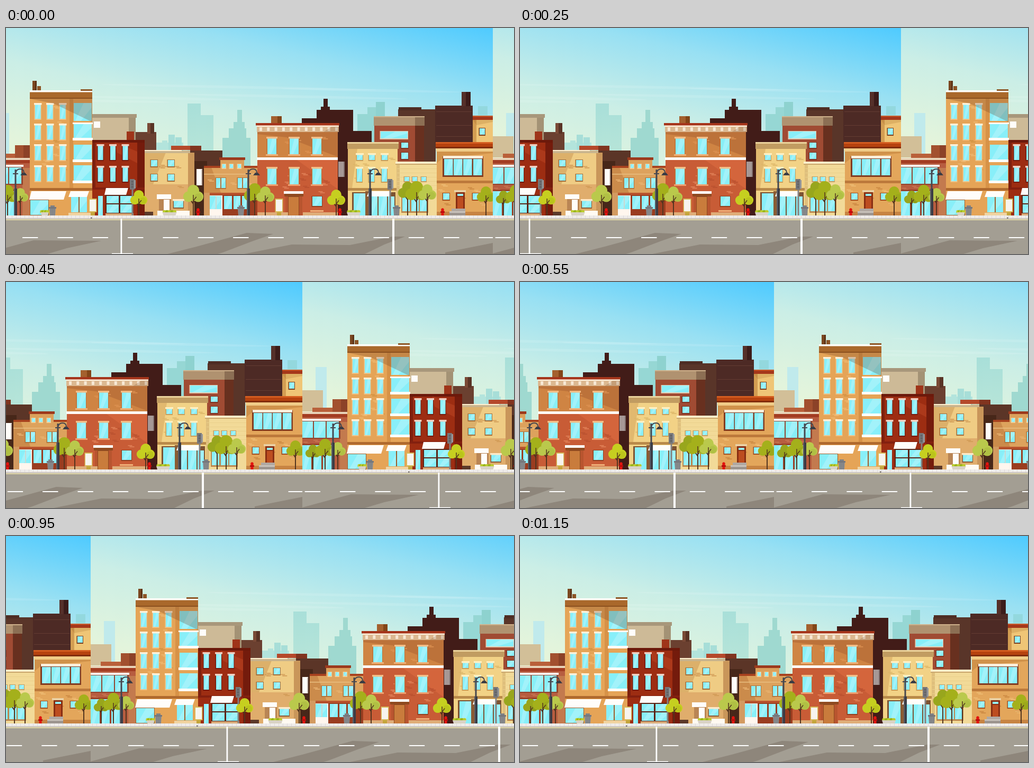
These frames come from a looping animation (960x428 px, 1.2 s). An HTML page with a canvas:

```html
<!DOCTYPE html>
<html lang="en">
<head>
<meta charset="utf-8">
<title>City street</title>
<style>
html, body { margin: 0; width: 100%; height: 100%; overflow: hidden; background: #a39e93; }
#stage { position: relative; width: 960px; height: 428px; overflow: hidden; }
#strip { position: absolute; left: 0; top: 0; width: 1920px; height: 428px; will-change: transform; }
canvas { position: absolute; top: 0; left: 0; width: 960px; height: 428px; }
canvas + canvas { left: 960px; }
</style>
</head>
<body>
<div id="stage"><div id="strip"><canvas width="960" height="428"></canvas><canvas width="960" height="428"></canvas></div></div>
<script>
const [first, second] = document.querySelectorAll('canvas');
const g = first.getContext('2d');
const GLASS = '#88eff9', WHITE = '#fffdfa';

let seed = 7;
const rnd = () => (seed = seed * 16807 % 2147483647) / 2147483647;

// Rectangle by its edges: left, top, right, bottom
function box(color, l, t, r, b) {
  g.fillStyle = color;
  g.fillRect(l, t, r - l, b - t);
}
function poly(color, ...p) {
  g.fillStyle = color;
  g.beginPath();
  for (let i = 0; i < p.length; i += 2) g.lineTo(p[i], p[i + 1]);
  g.fill();
}
function disc(color, x, y, r) {
  g.fillStyle = color;
  g.beginPath();
  g.arc(x, y, r, 0, 7);
  g.fill();
}
function path(color, width, d) {
  g.strokeStyle = color;
  g.lineWidth = width;
  g.stroke(new Path2D(d));
}
function fade(x0, y0, x1, y1, ...colors) {
  const f = g.createLinearGradient(x0, y0, x1, y1);
  colors.forEach((c, i) => f.addColorStop(i / (colors.length - 1), c));
  return f;
}
function glass(l, t, r, b) {
  const w = r - l, h = b - t;
  box(GLASS, l, t, r, b);
  poly('rgba(255,255,255,.22)', l + w * .55, t, r, t, r, t + h * .25, l + w * .4, b, l + w * .08, b);
}
function pane(l, t, r, b, frame, lintel) {
  box(frame, l - 1.5, t - 1, r + 1, b + 2);
  glass(l, t, r, b);
  if (lintel) box(lintel, l - 2, t - 2, r + 2, t + 1.5);
}
function grid(xs, ys, w, h, frame, lintel) {
  for (const y of ys) for (const x of xs) pane(x, y, x + w, y + h, frame, lintel);
}
function bricks(color, l, t, r, b, n) {
  while (n--) {
    const x = l + rnd() * (r - l - 12), y = t + rnd() * (b - t - 5);
    box(color, x, y, x + 8, y + 1.6);
    box(color, x + 3, y + 2.4, x + 12, y + 4);
  }
}

function sky() {
  box(fade(0, 330, 122, -197, '#f3f6d2', '#e2f4dc', '#cbeee6', '#98e0f3', '#4dcaff'), 0, 0, 960, 360);
  for (const [x, y, w] of [[330, 133, 150], [480, 112, 260], [590, 130, 210], [730, 118, 170], [220, 138, 130]]) {
    g.fillStyle = 'rgba(255,255,255,.11)';
    g.beginPath();
    g.ellipse(x, y, w, 2.5, .02, 0, 7);
    g.fill();
  }
}

function skyline() {
  const teal = fade(0, 140, 0, 260, '#a8dfd9', '#bae6d8');
  box('#c0eaec', 25, 161, 46, 250);
  box(teal, 383, 143, 408, 260);
  box(teal, 408, 165, 432, 260);
  box('#b3e4dc', 324, 217, 375, 250);
  box('#b3e4dc', 335, 213, 345, 250);
  box('#a7ded8', 347, 202, 359, 250);
  box('#a7ded8', 360, 207, 372, 250);
  const tower = '#9fd9d0';
  box(tower, 449, 208, 502, 265);
  box(tower, 461, 190, 494, 210);
  box(tower, 470, 178, 491, 192);
  box(tower, 477, 155, 486, 180);
  box('#96d7d4', 704, 163, 756, 220);
  box('#96d7d4', 723, 150, 740, 170);
  box('#8ed2cf', 739, 140, 756, 220);
  box('#93d8de', 932, 148, 950, 170);
  box('#a2dfe0', 918, 165, 960, 180);
}

function backRow() {
  box('#d2bf98', 0, 205, 39, 245);
  box('#b9603a', 19, 238, 60, 248);
  box('#a2502f', 57, 222, 86, 250);
  box('#8c4228', 73, 222, 86, 250);
  // Beige block and its neighbours
  box('#6b4030', 284, 197, 324, 240);
  box('#593325', 307, 180, 320, 200);
  box('#7a4a36', 307, 180, 313, 200);
  box('#cdba97', 203, 168, 285, 214);
  box('#a39275', 272, 168, 285, 214);
  box('#a8977b', 203, 163, 287, 170);
  box(WHITE, 206, 177, 218, 189);
  box('#9f3419', 268, 196, 282, 214);
  box('#5b3527', 388, 232, 449, 300);
  box('#472719', 388, 252, 420, 355);
  // Dark stepped block
  const dark = '#421c18';
  box(dark, 599, 171, 696, 355);
  box(dark, 627, 155, 696, 200);
  box(dark, 635, 149, 652, 156);
  box(dark, 640, 134, 648, 150);
  box(dark, 690, 195, 731, 230);
  // Red block
  box('#593529', 781, 154, 852, 258);
  box('#4e2d24', 782, 150, 825, 156);
  box('#a04b33', 736, 182, 813, 256);
  box('#68301f', 813, 182, 830, 256);
  box('#b09270', 735, 167, 831, 185);
  box('#cfb18b', 735, 167, 831, 169);
  box('#8c6f54', 813, 169, 831, 185);
  pane(748, 196, 799, 209, '#e5cbb0');
  pane(787, 217, 800, 227, '#7c3524');
  pane(787, 236, 800, 248, '#7c3524');
  // Dark block with stack
  box('#4d2a25', 851, 147, 922, 217);
  for (const y of [158, 184, 205]) box('#633c33', 853, y, 920, y + 1);
  box('#55302a', 901, 121, 918, 148);
  box('#3c1c1a', 909, 121, 918, 148);
  // Yellow tower
  box('#efc576', 922, 172, 960, 217);
  box('#d39d52', 922, 172, 929, 217);
  poly('rgba(150,90,30,.2)', 922, 174, 960, 174, 960, 178, 929, 184);
  box('#a5371a', 922, 166, 960, 174);
  box('#c95a2c', 922, 166, 960, 168);
  pane(935, 190, 945, 202, '#7b4020');
}

function brickShop() {
  box('#b75d40', 0, 250, 85, 355);
  box('#c37a4e', 71, 265, 85, 355);
  box('#e8d3b8', 0, 246, 85, 250);
  box('#a33c22', 0, 250, 85, 256);
  box('#934630', 0, 261, 72, 297);
  for (const [l, r] of [[0, 20], [22, 44], [46, 69]]) glass(l, 264, r, 295);
  box(WHITE, 0, 259, 73, 263);
  bricks('#c87652', 2, 298, 80, 308, 3);
  box('#9b4128', 0, 306, 58, 355);
  for (const x of [0, 19, 39]) glass(x, 309, x + 17, 355);
}

function tanTower() {
  box('#7b4720', 90, 100, 98, 119);
  box('#5d3216', 95, 100, 98, 119);
  box('#8c5426', 99, 110, 106, 119);
  box('#e5a457', 85, 121, 203, 355);
  box('#d79247', 160, 134, 167, 303);
  bricks('#efb971', 88, 140, 160, 300, 6);
  bricks('#d0903f', 88, 140, 160, 300, 4);
  grid([95, 118, 142], [144, 183, 222, 262], 10.5, 28, '#eec48a', '#fff1d8');
  for (const [t, b, sill] of [[142, 176, 179], [182, 208, 208], [221, 249, 249], [260, 289, 289]]) {
    glass(168, t, 202, b);
    box(WHITE, 166, sill, 204, sill + (sill > 180 ? 5 : 3));
  }
  poly('rgba(110,60,30,.27)', 85, 134, 203, 134, 203, 178, 130, 143);
  box('#a9682b', 85, 121, 203, 134);
  box('#8b501f', 85, 132, 203, 134);
  box(WHITE, 85, 118, 203, 121.5);
  box('#8d5524', 181, 116, 203, 119);
  box('#b06a2e', 85, 303, 203, 308);
  box('#9c5d2a', 85, 325, 121, 355);
  glass(86, 326, 120, 354);
  glass(163, 320, 193, 349);
  box('#9c5d2a', 177, 320, 179, 349);
  box('#f0d4a2', 158, 350, 203, 355);
  poly(WHITE, 88, 309, 154, 309, 149, 325, 84, 325);
  poly(WHITE, 162, 309, 197, 309, 193, 320, 158, 320);
}

function redHouse() {
  box('#9d2d12', 203, 216, 302, 355);
  box('#741b0c', 288, 216, 302, 355);
  box('#7d200e', 203, 216, 209, 303);
  poly('#ac391b', 245, 216, 288, 234, 288, 256, 250, 236);
  grid([213.5, 237, 260.5], [222, 263], 10, 28, '#74190b', '#f3cfc0');
  box('#6c190b', 203, 212, 302, 217);
  box('#83200f', 203, 302, 302, 306);
  glass(214, 318, 223, 355);
  box('#5c2415', 228, 316, 281, 352);
  glass(230, 318, 253, 332);
  glass(256, 318, 279, 332);
  glass(230, 334, 253, 350);
  glass(256, 334, 279, 350);
  box('#d9aa78', 228, 351, 281, 355);
  poly(WHITE, 229, 303, 271, 303, 267, 316, 226, 316);
}

function creamHouse() {
  box('#efcc84', 302, 236, 384, 355);
  box('#c9965a', 384, 236, 396, 355);
  poly('#dcb06a', 302, 236, 342, 236, 318, 296, 302, 296);
  box('#e0ad6c', 302, 296, 384, 355);
  box('#b5482a', 352, 223, 409, 231);
  box('#81341f', 388, 223, 409, 232);
  box('#c9b48d', 302, 232, 388, 237);
  box('#fff0cf', 302, 231, 372, 233);
  bricks('#d09a55', 304, 240, 382, 310, 6);
  grid([314, 346], [250, 277], 12, 12, '#a36c38');
  box(WHITE, 325, 315, 352, 324);
  box('#b98554', 329, 324, 352, 355);
  box(WHITE, 338, 325, 349, 346);
  pane(357, 326, 375, 340, '#8d5a34', '#ffe9c6');
  box('#fffaf2', 326, 346, 387, 355);
  box('#5c392a', 302, 348, 318, 355);
}

function lowShop() {
  box('#dba05b', 445, 250, 490, 264);
  box('#9c3a1d', 443, 245, 492, 250);
  box('#dda25d', 414, 264, 516, 355);
  poly('#cb8b4b', 414, 264, 428, 264, 446, 312, 414, 312);
  for (const x of [449, 463, 478]) pane(x, 258, x + 6, 265, '#f2cf98');
  box('#a8421f', 414, 261, 445, 265);
  box('#a8421f', 490, 261, 516, 265);
  box('#e9bf82', 414, 276, 516, 277.5);
  bricks('#e9b472', 416, 280, 514, 310, 4);
  for (const x of [437, 478]) {
    pane(x, 284, x + 18, 303, '#b2743c');
    box('#b2743c', x + 8, 284, x + 10, 303);
  }
  box('#9a3d20', 424, 312, 516, 355);
  box('#b9532d', 424, 312, 516, 316);
  box('#fff6ee', 425, 317, 449, 355);
  glass(425, 318, 447, 343);
  box('#c9d8d2', 436, 318, 438, 343);
  glass(452, 318, 467, 343);
  glass(470, 318, 483, 343);
  glass(486, 318, 497, 343);
  box('#d39a60', 414, 312, 425, 355);
}

function brickHouse() {
  box('#a4602e', 541, 167, 561, 182);
  box('#834518', 553, 167, 561, 182);
  box('#cf8443', 515, 196, 667, 246);
  box('#d4653c', 515, 250, 667, 355);
  poly('rgba(110,40,20,.2)', 515, 197, 667, 197, 667, 244, 570, 207, 515, 201);
  poly('rgba(130,35,15,.14)', 515, 250, 590, 250, 667, 305, 667, 355, 515, 355);
  bricks('#de9252', 520, 205, 660, 240, 5);
  bricks('#e2835a', 520, 255, 660, 345, 6);
  bricks('#b9502f', 520, 255, 660, 345, 5);
  grid([534, 576, 619], [208, 265], 17, 31, '#bd7038', '#f3bd86');
  for (const x of [534, 576, 619]) {
    box('#f0b077', x - 3, 239, x + 20, 242);
    box('#f0a070', x - 3, 296, x + 20, 299);
  }
  pane(619, 319, 637, 337, '#93401f');
  box('#f0b078', 615, 345, 640, 348);
  box('#dcb890', 514, 184, 669, 197);
  for (let x = 519; x < 666; x += 14.3) box('#f7e8d4', x, 188, x + 5, 195);
  poly('rgba(120,70,30,.22)', 655, 187, 669, 184, 669, 197, 640, 197);
  box('#fff0dc', 514, 184, 669, 187);
  box('#a5351b', 512, 180, 670, 184.5);
  box(WHITE, 514, 245, 667, 250);
  box('#b8552f', 568, 314, 600, 355);
  box('#8f4a20', 573, 319, 594, 355);
  box('#c97c3c', 574, 320, 593, 355);
  box('#8f4a20', 566, 314, 602, 319);
  box(WHITE, 565, 309, 602, 314);
  box('#dfad78', 515, 349, 573, 355);
  box('#dfad78', 601, 349, 667, 355);
  box('#a69896', 668, 253, 680, 282);
  box('#81706e', 678, 253, 680, 282);
}

function paleHouse() {
  box('#f2d286', 686, 228, 780, 355);
  poly('#e2b96f', 686, 228, 704, 228, 694, 303, 686, 303);
  box('#c19c61', 685, 216, 782, 229);
  box('#ecd49c', 685, 216, 782, 219);
  bricks('#dcb567', 690, 232, 776, 300, 6);
  grid([703, 726, 750], [239], 11, 11, '#c99c58', '#fff0c2');
  grid([703, 726, 750], [265], 10, 26, '#c99c58', '#fff0c2');
  box('#b98a4a', 686, 303, 780, 308);
  box('#7d5231', 694, 311, 776, 355);
  glass(697, 313, 719, 355);
  box('#8a5c34', 719, 309, 725, 355);
  glass(725, 319, 742, 355);
  glass(744, 319, 760, 355);
  glass(762, 319, 774, 355);
  poly(WHITE, 726, 309, 768, 309, 766, 319, 722, 319);
}

function smallHouse() {
  box('#f2da98', 778, 258, 856, 355);
  box('#dfbf7c', 778, 258, 784, 355);
  for (let y = 266; y < 312; y += 8) box('#ead08b', 779, y, 854, y + 1);
  box('#fff0c9', 776, 253, 856, 257);
  box('#c9a76d', 776, 257, 856, 259);
  grid([793, 808, 825], [282], 9, 8, '#c79c5f');
  box('#bb8750', 787, 314, 838, 350);
  for (const x of [789, 806, 822]) glass(x, 317, x + 14, 347);
}

function cornerHouse() {
  box('#e3a65b', 854, 228, 960, 355);
  poly('#d0924a', 854, 228, 960, 228, 960, 237, 866, 246, 854, 256);
  bricks('#c98640', 856, 296, 958, 340, 4);
  bricks('#efbd75', 856, 296, 958, 340, 4);
  box('#f0cc88', 853, 228, 960, 234);
  box('#b6420f', 852, 216, 960, 226);
  box('#d55e20', 852, 216, 960, 219);
  box('#812c0c', 852, 225, 960, 228);
  box('#813b20', 865, 243, 942, 282);
  for (const x of [868, 886, 904, 923]) glass(x, 248, x + 16.5, 279);
  box('#fff0dd', 866, 242, 941, 247);
  box('#bc793b', 854, 289, 960, 294);
  grid([866, 922], [313], 12, 12, '#a04f22');
  box('#ead0a4', 887, 307, 909, 311);
  box('#882e13', 890, 311, 907, 342);
  box('#bd4d20', 893, 320, 904, 342);
  glass(893, 314, 904, 318);
  box('#c78443', 854, 348, 960, 355);
  box('#b0a8a2', 882, 342, 908, 355);
  box('#c9c2bb', 878, 347, 908, 350);
  box('#9d958f', 878, 350, 908, 355);
}

function tree(x, y, s, color, shade) {
  path('#53351f', 2, `M${x} ${y - 2}V355M${x} ${y + s * .75}l${s * .4} ${-s * .55}M${x} ${y + s * .9}l${-s * .35} ${-s * .5}`);
  for (const [dx, dy, r] of [[0, -.42, .58], [-.48, .18, .53], [.48, .18, .53], [0, .12, .5]])
    disc(color, x + dx * s, y + dy * s, r * s);
  disc(shade, x + .48 * s, y + .26 * s, .4 * s);
  path('#53351f', 1.5, `M${x} ${y}V${y + s}M${x} ${y + s * .6}l${s * .3} ${-s * .4}`);
}
function lamp(x) {
  box('#46474f', x - 1.5, 268, x + 1.5, 355);
  box('#3b3c44', x - 3, 304, x + 3, 355);
  box('#5c5e66', x - 3, 304, x - 1, 355);
  path('#46474f', 2, `M${x} 290V276q1-9 9-9q7 0 7 8M${x - 5} 276h10`);
  poly('#3b3c44', x + 13, 274, x + 18, 274, x + 22, 279, x + 9, 279);
}
function signal(x) {
  box('#85817f', x - 1.5, 304, x + 1.5, 355);
  box('#77777a', x - 5, 286, x + 4, 306);
  box('#96979a', x + 3, 288, x + 6, 304);
  for (const y of [291, 296, 301]) disc('#626266', x - .5, y, 2);
}
function bin(x) {
  poly('#8d8e90', x - 6, 341, x + 6, 341, x + 5, 355, x - 5, 355);
  for (const dx of [-3, 0, 3]) box('#75767a', x + dx - .5, 342, x + dx + .5, 355);
  box('#75767b', x - 7, 339, x + 7, 342);
  box('#808184', x - 4, 336, x + 4, 339);
}
function hydrant(x) {
  box('#e3140e', x - 2.5, 344, x + 2.5, 355);
  disc('#e3140e', x, 344, 2.7);
  box('#b90d0b', x - 4, 347, x + 4, 350);
}
function planter(x, w) {
  for (let i = 0; i < 5; i++) disc(i % 2 ? '#9bb51c' : '#bdcd30', x - w * .36 + i * w * .18, 348, 3.3);
  poly('#d9d2c5', x - w / 2, 349, x + w / 2, 349, x + w / 2 - 2, 355, x - w / 2 + 2, 355);
}
function board(x) {
  box('#c4a53c', x - 4, 347, x + 4, 355);
  box('#d7ba59', x - 7.5, 323, x + 7.5, 349);
  box('#f7f4ee', x - 6, 325, x + 6, 347);
}

function street() {
  const OLIVE = '#a4b01b', MOSS = '#9ca81a', LIGHT = '#bac94c', LEAF = '#b0c044', LIME = '#c6cf20', LIMED = '#bbc41b';
  planter(113, 15);
  bin(128);
  tree(20, 322, 14, '#98a61d', '#909e1b');
  tree(43, 316, 19, OLIVE, MOSS);
  tree(67, 318, 15, LIGHT, LEAF);
  lamp(58);
  board(204);
  signal(279);
  tree(291, 323, 16, LIME, LIMED);
  planter(349, 27);
  box(WHITE, 400, 267, 411, 298);
  box('#c9bcb4', 409, 268, 411, 298);
  tree(394, 316, 19, LIGHT, LEAF);
  hydrant(403);
  bin(484);
  tree(510, 314, 20, OLIVE, MOSS);
  tree(530, 317, 17, LIGHT, LEAF);
  lamp(498);
  board(556);
  tree(664, 323, 17, LIME, LIMED);
  hydrant(671);
  planter(697, 26);
  lamp(728);
  signal(766);
  bin(778);
  tree(799, 309, 18, '#98a61d', '#909e1b');
  tree(816, 311, 21, OLIVE, MOSS);
  tree(836, 313, 17, LIGHT, LEAF);
  hydrant(865);
  tree(947, 317, 17, OLIVE, MOSS);
}

function road() {
  box('#efecea', 0, 355, 960, 361);
  for (let x = 3; x < 960; x += 8) box('#dfdad7', x, 355, x + 1, 360);
  box('#d0cac2', 0, 360, 960, 362);
  box('#a39e93', 0, 362, 960, 428);
  box('#eee3a9', 0, 362.5, 960, 364);
  const shade = '#8e867b';
  poly(shade, 0, 427, 92, 402, 220, 403, 155, 417, 118, 428, 0, 428);
  poly(shade, 345, 428, 400, 414, 495, 388, 545, 390, 505, 404, 450, 425, 440, 428);
  poly(shade, 490, 428, 580, 410, 690, 411, 770, 395, 794, 395, 755, 410, 718, 428);
  poly(shade, 870, 425, 960, 407, 960, 428, 870, 428);
  for (let i = 0; i < 15; i++) {
    const x = 4.7 + i * 66.35;
    box('#fff', x, 396, x + 29.3, 398);
  }
  box('#fff', 256.5, 361, 259.3, 428);
  box('#fff', 770, 361, 774, 428);
  box('#fff', 240, 426.6, 280, 428);
  box('#77716c', 200, 358.5, 202.5, 361);
}

[sky, skyline, backRow, brickShop, tanTower, redHouse, creamHouse, lowShop, brickHouse,
 paleHouse, smallHouse, cornerHouse, street, road].forEach(draw => draw());
second.getContext('2d').drawImage(first, 0, 0);

// 24 hard steps of 40 px
document.getElementById('strip').animate(
  [{ transform: 'translateX(-40px)' }, { transform: 'translateX(-1000px)' }],
  { duration: 1200, iterations: Infinity, easing: 'steps(24, end)' }
);
</script>
</body>
</html>
```
